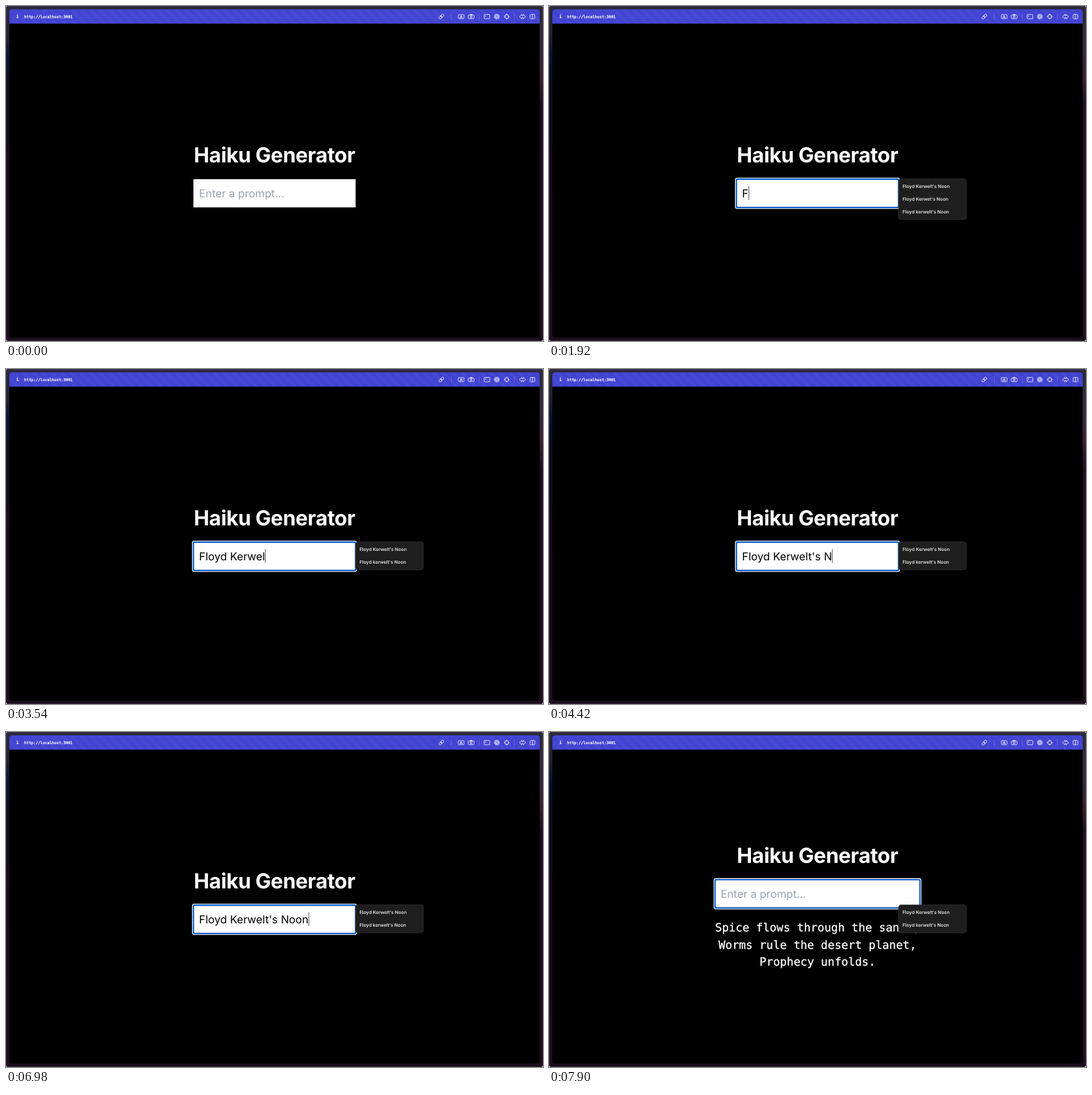
Recreate the animation shown at these times as an HTML page with a canvas. Size 800 by 499 pixels, loop 8000 ms.

```html
<!DOCTYPE html>
<html lang="en">
<head>
<meta charset="utf-8">
<title>Haiku Generator</title>
<style>
  html, body { margin: 0; width: 100%; height: 100%; overflow: hidden; background: #fff; }
  canvas { display: block; width: 800px; height: 499px; }
</style>
</head>
<body>
<canvas id="stage"></canvas>
<script>
const W = 800, H = 499, LOOP = 8000;
const SANS = 'Inter, sans-serif';
const MONO = '"DejaVu Sans Mono", monospace';

const FOCUS = 620, TYPE = 1920, NARROW = 3540, ANSWER = 7060;
const PROMPT = "Floyd Kerwelt's Noon";
const KEYS = [1920, 2140, 2220, 2300, 2400, 2600, 2920, 3000, 3100, 3180,
  3360, 3460, 3800, 3880, 4060, 4140, 4420, 4580, 4660, 4720];
const BLINKS = [620, 1160, 1760, 5300, 5860, 6400, 6980, 7540];

const MENU_ALL = [PROMPT, "what's your name?", "what is EWK Tomplix?",
  "What is EWK Tomplix?", "testing", "who are you?"];
const MENU_F = [PROMPT, "Floyd Kerwet's Noon", "Floyd kerwelt's Noon"];
const MENU_LAST = [MENU_F[0], MENU_F[2]];
const POEM = ["Spice flows through the sands,", "Worms rule the desert planet,", "Prophecy unfolds."];

const canvas = document.getElementById('stage');
const ctx = canvas.getContext('2d');
const dpr = window.devicePixelRatio || 1;
canvas.width = Math.round(W * dpr);
canvas.height = Math.round(H * dpr);

// "heft" thickens the strokes a little, as screen font smoothing does
function text(str, x, y, font, color, { align = 'left', spacing = 0, heft = 0 } = {}) {
  ctx.font = font;
  ctx.fillStyle = ctx.strokeStyle = color;
  ctx.textAlign = align;
  ctx.letterSpacing = spacing + 'px';
  ctx.fillText(str, x, y);
  if (heft) {
    ctx.lineWidth = heft;
    ctx.strokeText(str, x, y);
  }
}

function box(x, y, w, h, r, fill, stroke) {
  ctx.beginPath();
  ctx.roundRect(x, y, w, h, r);
  if (fill) { ctx.fillStyle = fill; ctx.fill(); }
  if (stroke) { ctx.strokeStyle = stroke; ctx.stroke(); }
}

function line(...pts) {
  ctx.beginPath();
  for (let i = 0; i < pts.length; i += 2) ctx.lineTo(pts[i], pts[i + 1]);
  ctx.stroke();
}

function ring(x, y, r) {
  ctx.beginPath();
  ctx.arc(x, y, r, 0, Math.PI * 2);
  ctx.stroke();
}

function fade(y, h, ...stops) {
  const g = ctx.createLinearGradient(0, y, 0, y + h);
  for (const [at, color] of stops) g.addColorStop(at, color);
  return g;
}

function drawDesktop() {
  ctx.fillStyle = '#fff';
  ctx.fillRect(0, 0, W, H);
  ctx.save();
  ctx.beginPath();
  ctx.roundRect(0, 0, W, H, 3);
  ctx.clip();
  ctx.fillStyle = fade(0, H, [0, '#2d2a3a'], [0.09, '#211f31'], [0.15, '#0b1131'],
    [0.25, '#0d0c1c'], [0.5, '#150c1b'], [1, '#1c0d1d']);
  ctx.fillRect(0, 0, W / 2, H);
  ctx.fillStyle = fade(0, H, [0, '#2d2a3a'], [0.14, '#33283a'], [0.21, '#3b2032'],
    [0.3, '#1c0d1f'], [1, '#1c0d1d']);
  ctx.fillRect(W / 2, 0, W / 2, H);
  ctx.fillStyle = '#2d2a3a';
  ctx.fillRect(0, 0, W, 5);
  ctx.lineWidth = 1;
  box(0.5, 0.5, W - 1, H - 1, 3, null, 'rgba(120,90,140,.25)');
  ctx.restore();
  box(5, 5, 790, 489, 4, '#000');
}

function drawBar() {
  ctx.save();
  ctx.beginPath();
  ctx.roundRect(5, 5, 790, 21.2, [4, 4, 0, 0]);
  ctx.clip();
  ctx.fillStyle = '#4044d3';
  ctx.fillRect(5, 5, 790, 22);
  ctx.strokeStyle = 'rgba(88,76,205,.3)';
  ctx.lineWidth = 5;
  for (let x = -20; x < W; x += 14.2) line(x, 2, x + 28, 30);
  ctx.restore();

  text('i', 17, 18.4, 'bold 7px ' + MONO, '#fff', { align: 'center' });
  text('http://localhost:3001', 27, 18, '5.73px ' + MONO, '#fff', { heft: 0.25 });

  ctx.strokeStyle = 'rgba(255,255,255,.25)';
  ctx.lineWidth = 0.7;
  for (const x of [663.3, 705, 757.3]) line(x, 10.5, x, 21);
  drawIcons();
}

function drawIcons() {
  const ink = '#e9e9fb';
  ctx.strokeStyle = ink;
  ctx.lineWidth = 0.9;

  // link
  ctx.save();
  ctx.translate(648.5, 15.8);
  ctx.rotate(-Math.PI / 4);
  box(-4.4, -1.7, 5.2, 3.4, 1.7, null, ink);
  box(-0.8, -1.7, 5.2, 3.4, 1.7, null, ink);
  ctx.restore();

  // card
  box(673.9, 12.9, 8.4, 5.9, 1, null, ink);
  ctx.fillStyle = ink;
  ctx.beginPath();
  ctx.arc(678.1, 14.9, 1, 0, Math.PI * 2);
  ctx.fill();
  ctx.fillRect(676, 16.2, 4.2, 1.2);

  // camera
  box(688.7, 13.5, 8.6, 5.3, 1.1, null, ink);
  line(690.8, 13.5, 691.6, 12.4, 694.4, 12.4, 695.2, 13.5);
  ring(693, 16, 1.4);

  // console
  box(712.3, 12.6, 8.4, 6.4, 0.8, null, ink);
  line(713.9, 14.2, 715, 15.1, 713.9, 16);

  // aperture
  ring(731.2, 15.8, 3.6);
  ring(731.2, 15.8, 1.5);
  for (let i = 0; i < 6; i++) {
    const a = i * Math.PI / 3, b = a + 0.9;
    line(731.2 + 1.5 * Math.cos(a), 15.8 + 1.5 * Math.sin(a),
      731.2 + 3.6 * Math.cos(b), 15.8 + 3.6 * Math.sin(b));
  }

  // crosshair
  ring(746, 15.8, 3);
  for (const [dx, dy] of [[1, 0], [-1, 0], [0, 1], [0, -1]])
    line(746 + dx * 1.8, 15.8 + dy * 1.8, 746 + dx * 4.3, 15.8 + dy * 4.3);

  // double arrow
  line(768.4, 12.4, 764.9, 15.8, 768.4, 19.2, 768.4, 17.3, 770.6, 17.3,
    770.6, 19.2, 774.1, 15.8, 770.6, 12.4, 770.6, 14.3, 768.4, 14.3, 768.4, 12.4);

  // split view
  box(780.9, 12.6, 6.8, 6.4, 0.8, null, ink);
  line(784.3, 12.6, 784.3, 19);
}

function caretOn(t) {
  return BLINKS.filter(b => b <= t).length % 2 === 1;
}

function drawInput(t, left, top, width) {
  const height = 42.2;
  const inset = (d, r, fill) =>
    box(left + d, top + d, width - 2 * d, height - 2 * d, r, fill);
  if (t >= FOCUS) {
    inset(-2.1, 3.2, '#fff');
    inset(-1.05, 2.2, '#1161c9');
    inset(1.1, 1, '#fff');
  } else {
    inset(0, 0, '#fff');
  }
  const count = t < ANSWER ? KEYS.filter(k => k <= t).length : 0;
  const typed = PROMPT.slice(0, count);
  const x = left + 8.4, font = '16.2px ' + SANS;
  text(typed || 'Enter a prompt...', x, top + 27.3, font, typed ? '#000' : '#9ca3af');
  if (caretOn(t)) {
    ctx.fillStyle = '#666';
    ctx.fillRect(x + ctx.measureText(typed).width, top + 10.4, 1.1, 20.6);
  }
}

function drawMenu(t) {
  const items = t < TYPE ? MENU_ALL : t < NARROW ? MENU_F : MENU_LAST;
  ctx.lineWidth = 0.7;
  box(520.8, 257.5, 100.9, items.length * 19 + 3.6, 3.5, '#1e1e1e', '#363636');
  items.forEach((s, i) => text(s, 526.8, 271.3 + i * 19, '600 6.8px ' + SANS, '#e6e6e6'));
}

function draw(t) {
  ctx.setTransform(dpr, 0, 0, dpr, 0, 0);
  ctx.textRendering = 'geometricPrecision';
  drawDesktop();
  drawBar();

  const answered = t >= ANSWER;
  const top = answered ? 219.95 : 257.9;
  const width = answered ? 305.2 : 241.6;
  text('Haiku Generator', 400, top - 24.5, '700 31px ' + SANS, '#fff',
    { align: 'center', spacing: -0.42 });
  drawInput(t, 400 - width / 2, top, width);
  if (answered)
    POEM.forEach((s, i) => text(s, 400, 297.3 + i * 25.3, '16.9px ' + MONO, '#fff',
      { align: 'center', heft: 0.3 }));
  if (t >= FOCUS) drawMenu(t);
}

const start = performance.now();
function tick(now) {
  draw(Math.max(0, now - start) % LOOP);
  requestAnimationFrame(tick);
}
draw(0);
requestAnimationFrame(tick);
</script>
</body>
</html>
```
